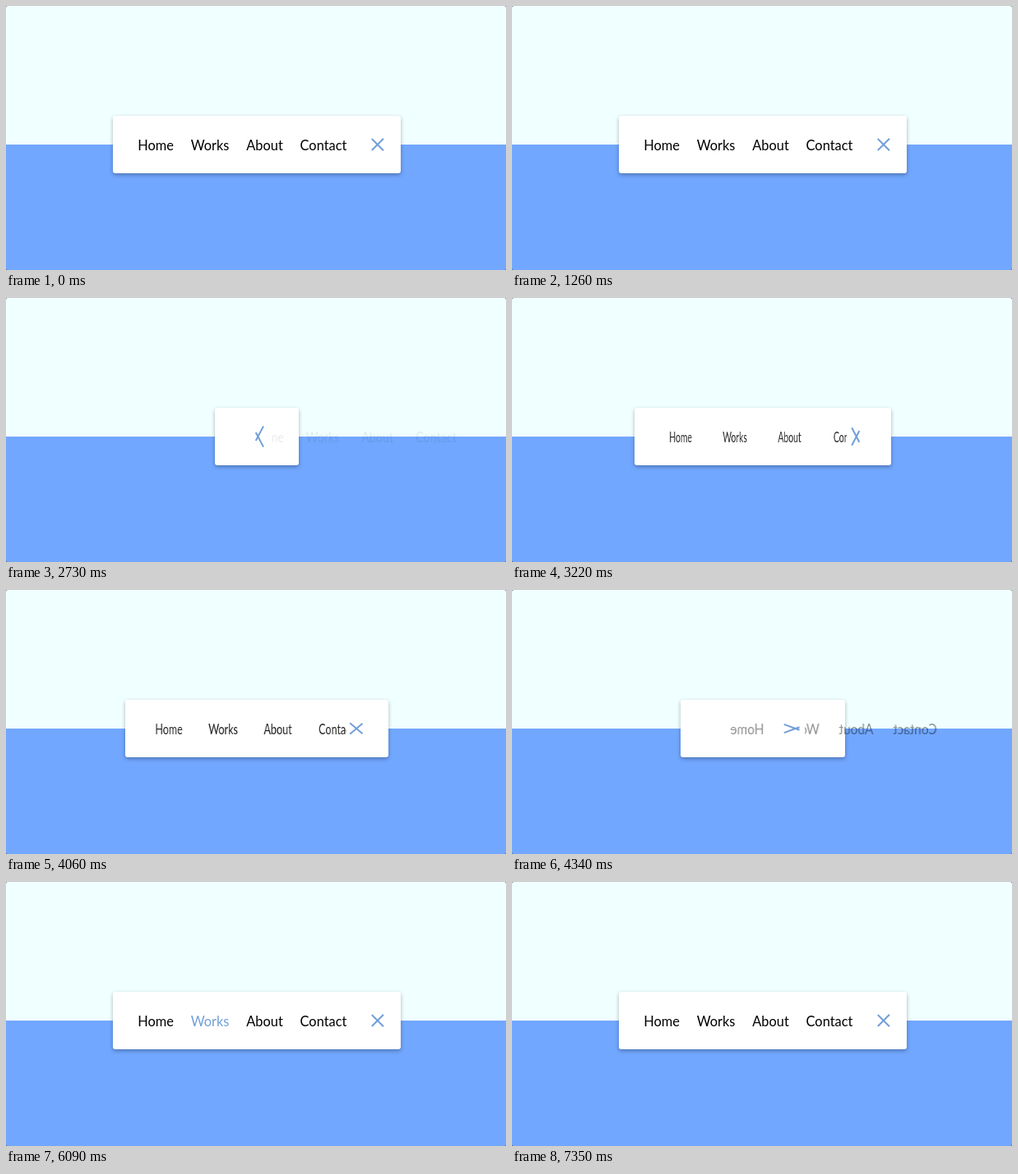
Recreate the animation shown at these times as an HTML page. Size 608 by 322 pixels, loop 7.98 s.

```html
<!DOCTYPE html>
<html lang="en">
<head>
<meta charset="utf-8">
<title>Animated navigation</title>
<style>
  @property --p {
    syntax: "<number>";
    inherits: true;
    initial-value: 1;
  }

  :root {
    --accent: #729fd8;
    --loop: 7980ms;
    --lead: -10ms;
  }

  html, body {
    margin: 0;
    width: 100%;
    height: 100%;
    overflow: hidden;
    background: #555;
  }

  .stage {
    position: relative;
    width: 608px;
    height: 322px;
    overflow: hidden;
    border-radius: 2px;
    background: linear-gradient(#f0ffff 169px, #71a7fe 169px);
  }

  .scene {
    width: 610px;
    height: 338px;
    display: flex;
    align-items: center;
    justify-content: center;
  }

  /* --p: 0 is closed, 1 is open */
  nav {
    box-sizing: border-box;
    width: calc(80px + 270px * var(--p));
    padding: 20px;
    display: flex;
    align-items: center;
    justify-content: center;
    background: #fff;
    border-radius: 3px;
    box-shadow: 0 2px 5px rgba(0, 0, 0, .3);
    animation: toggle var(--loop) var(--lead) step-end infinite;
  }

  ul {
    display: flex;
    width: calc(100% * var(--p));
    margin: 0;
    padding: 0;
    list-style: none;
    font: 16.4px Lato, "Open Sans", sans-serif;
  }

  li {
    flex: none;
    text-align: center;
    white-space: nowrap;
    color: #000;
    opacity: var(--p);
    transform: rotateY(calc(360deg * var(--p)));
    animation: var(--loop) var(--lead) step-end infinite;
  }
  .home { width: 64px; animation-name: home; }
  .works { width: 68px; animation-name: works; }
  .about { width: 65px; animation-name: about; }
  .contact { width: 78px; animation-name: contact; }

  .icon {
    position: relative;
    width: 30px;
    height: 30px;
    background: #fff;
  }

  .icon i {
    --turn: calc(-765deg * var(--p));
    --shift: calc(5.5px * var(--p));
    position: absolute;
    left: 5px;
    top: 10px;
    width: 20px;
    height: 2px;
    background: var(--accent);
    transform: rotate(var(--turn)) translateY(var(--shift));
  }
  .icon i + i {
    --turn: calc(765deg * var(--p));
    --shift: calc(-5.5px * var(--p));
    top: 18px;
  }

  @keyframes toggle {
    0% { --p: 1; }
    15.7895% { --p: 1; animation-timing-function: steps(9); }
    23.6842% { --p: 0; }
    34.2105% { --p: .0815; animation-timing-function: steps(7); }
    40.3509% { --p: .8593; }
    41.2281% { --p: 1; }
    50% { --p: 1; animation-timing-function: steps(9); }
    57.8947% { --p: 0; }
    68.4211% { --p: .0815; animation-timing-function: steps(8); }
    75.4386% { --p: .9704; }
    76.3158%, 100% { --p: 1; }
  }

  /* the pointer passing over each link */
  @keyframes home {
    0%, 81.5789%, 100% { color: #000; }
    78.9474% { color: var(--accent); }
  }
  @keyframes works {
    0%, 77.193%, 85.0877%, 100% { color: #000; }
    76.3158%, 81.5789% { color: var(--accent); }
  }
  @keyframes about {
    0%, 22.807%, 89.4737%, 100% { color: #000; }
    20.1754%, 86.8421% { color: var(--accent); }
  }
  @keyframes contact {
    0%, 92.1053%, 100% { color: #000; }
    90.3509% { color: var(--accent); }
  }
</style>
</head>
<body>
<div class="stage">
  <div class="scene">
    <nav>
      <ul>
        <li class="home">Home</li>
        <li class="works">Works</li>
        <li class="about">About</li>
        <li class="contact">Contact</li>
      </ul>
      <div class="icon"><i></i><i></i></div>
    </nav>
  </div>
</div>
</body>
</html>
```
